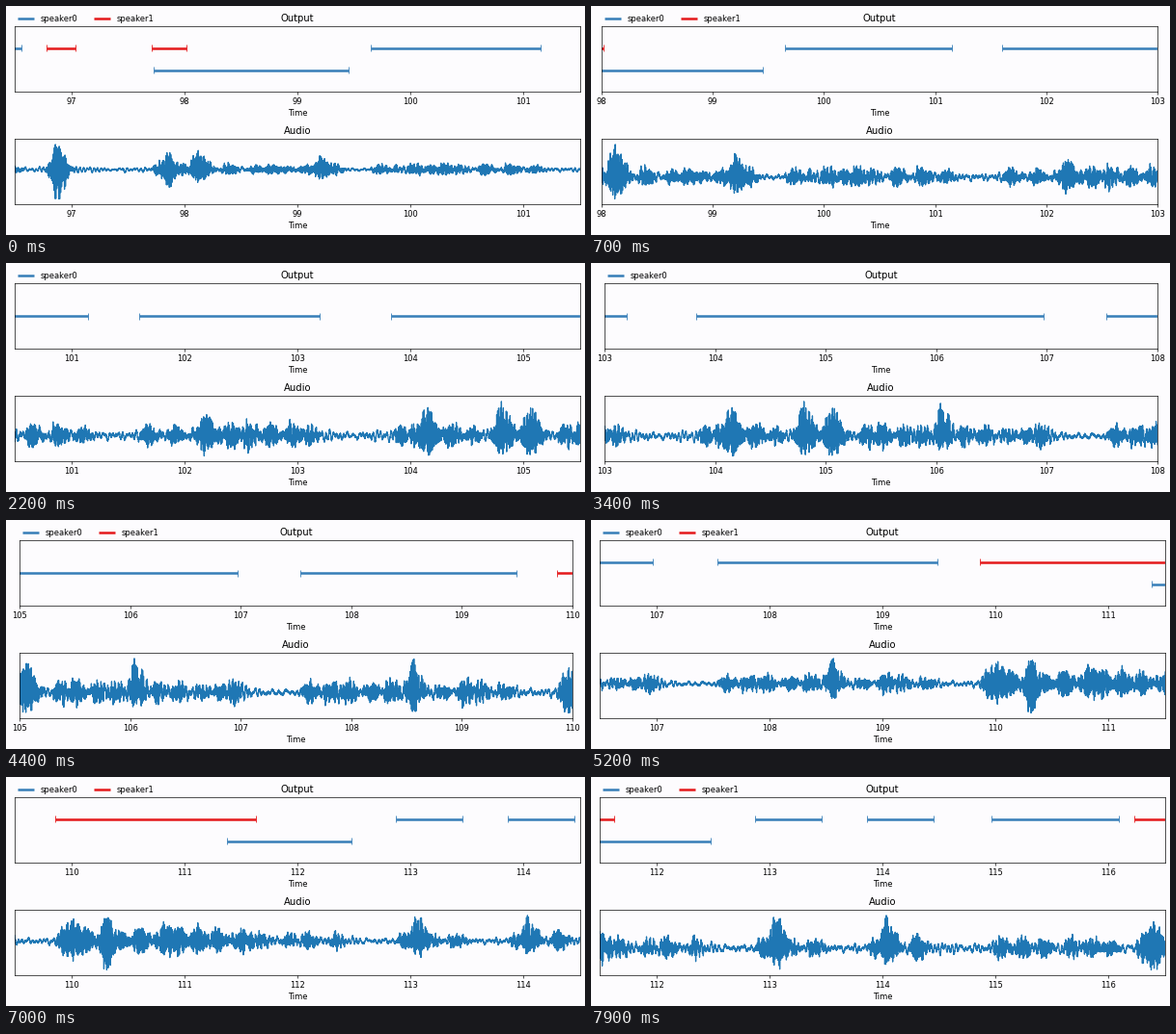
Recreate the animation shown at these times as a matplotlib script. Size 600 by 238 pixels, loop 8 s.

```python
import math

import matplotlib.pyplot as plt
import numpy as np
from matplotlib.animation import FuncAnimation

W, H, DPI = 600, 238, 64
SCALE = 60.4 / DPI
FRAMES, INTERVAL = 80, 100
START, SPAN = 96.5, 5

for key in ("font.size", "axes.linewidth", "axes.titlepad", "axes.labelpad",
            "xtick.major.size", "xtick.major.width", "xtick.major.pad",
            "lines.linewidth"):
    plt.rcParams[key] *= SCALE
plt.rcParams["font.family"] = "DejaVu Sans"
plt.rcParams["figure.facecolor"] = plt.rcParams["axes.facecolor"] = "#fdfcfe"

COLORS = ["#377eb8", "#e41a1c"]

# (speaker, start, end) in seconds
TURNS = [
    (0, 96.0, 96.56), (1, 96.78, 97.04), (1, 97.71, 98.02),
    (0, 97.73, 99.45), (0, 99.65, 101.15), (0, 101.6, 103.2),
    (0, 103.83, 106.97), (0, 107.54, 109.49), (1, 109.86, 111.63),
    (0, 111.38, 112.48), (0, 112.87, 113.46), (0, 113.86, 114.45),
    (0, 114.96, 116.09), (1, 116.23, 118.0),
]

# Loud syllables: time, height above and depth below the middle
ACCENTS = [
    (96.87, 52, 60), (97.86, 32, 36), (98.12, 44, 30), (99.2, 26, 19),
    (102.17, 24, 17), (104.14, 26, 18), (104.8, 36, 20), (105.05, 30, 20),
    (106.05, 30, 13), (108.55, 29, 17), (110.0, 31, 26), (110.3, 30, 36),
    (110.83, 24, 19), (113.06, 37, 20), (114.04, 29, 16), (116.4, 26, 22),
]


def syllables(rng):
    """The accents, and quieter syllables all through every turn."""
    yield from ACCENTS
    for who, a, b in TURNS:
        level = 18 if who else 13
        t = a + .08
        while t < b - .03:
            up = level * rng.uniform(.55, 1.05)
            yield t, up, .9 * up
            t += rng.uniform(.12, .24)


def make_audio(rate=1500):
    rng = np.random.default_rng(7)
    t = np.arange(START - .5, START + 21, 1 / rate)
    above, below = np.zeros((2, t.size))
    for mid, up, down in syllables(rng):
        d = t - mid
        shape = np.exp(-(d / np.where(d < 0, .06, .1)) ** 2)
        above = np.maximum(above, up * shape)
        below = np.maximum(below, down * shape)

    cells = np.arange(t[0], t[-1], 1 / 100)
    rough = np.interp(t, cells, 1 - .7 * rng.random(cells.size) ** 1.4)
    carrier = rough * np.sin(2 * np.pi * 117 * t + 2 * np.sin(9 * t))
    voice = carrier * np.where(carrier > 0, above, below)

    hum = sum(np.sin(2 * np.pi * f * t + p) for f, p in
              zip(rng.uniform(6, 36, 9), rng.uniform(0, 6.28, 9)))
    return t, voice + .85 * hum + rng.normal(0, .5, t.size)


def lay_out(lo):
    """Fit the axes so that tick labels on the edges stay inside."""
    left, right = 9, 595
    if lo == int(lo):
        left, right = (11 if lo < 100 else 14), 587
    for ax, bottom in ((top, 89.2), (low, 206.2)):
        ax.set_position([left / W, 1 - bottom / H, (right - left) / W, 68 / H])


def dress(ax, title, lo):
    ax.set_title(title)
    ax.set_xlabel("Time")
    ax.set_xlim(lo, lo + SPAN)
    ax.set_xticks(range(math.ceil(lo), math.floor(lo + SPAN) + 1))
    ax.set_yticks([])


def stack(turns):
    """Give each turn the first line that is free, as a height in 0..1."""
    ends, rows = [], []
    for _, a, b in turns:
        row = next((i for i, e in enumerate(ends) if a >= e), len(ends))
        ends[row:row + 1] = [b]
        rows.append(row)
    return [1 - (r + 1) / (len(ends) + 1) for r in rows]


def draw_turns(lo):
    turns = [s for s in TURNS if s[2] > lo and s[1] < lo + SPAN]
    handles = {}
    for (who, a, b), y in zip(turns, stack(turns)):
        color = COLORS[who]
        handles[who] = top.hlines(y, a, b, color, linewidth=3 * SCALE)
        top.vlines([a, b], y - .05, y + .05, color, linewidth=SCALE)
    who = sorted(handles)
    top.legend([handles[w] for w in who], [f"speaker{w}" for w in who],
               bbox_to_anchor=(0, 1), loc="lower left", ncol=5,
               borderaxespad=0, frameon=False)
    top.set_ylim(0, 1)


def draw_audio(lo):
    part = (time >= lo) & (time <= lo + SPAN)
    y = wave[part]
    low.plot(time[part], y, color="#1f77b4")
    pad = .1 * np.ptp(y)
    low.set_ylim(y.min() - pad, y.max() + pad)


def update(i):
    # three half-second steps in every eight ticks
    lo = START + .5 * ((3 * i + 4) // 8)
    top.clear()
    low.clear()
    lay_out(lo)
    draw_turns(lo)
    draw_audio(lo)
    dress(top, "Output", lo)
    dress(low, "Audio", lo)
    return []


time, wave = make_audio()
fig, (top, low) = plt.subplots(2, 1, figsize=(W / DPI, H / DPI), dpi=DPI)
anim = FuncAnimation(fig, update, frames=FRAMES, interval=INTERVAL,
                     init_func=lambda: update(0), repeat=True, repeat_delay=0)
plt.show()
```
